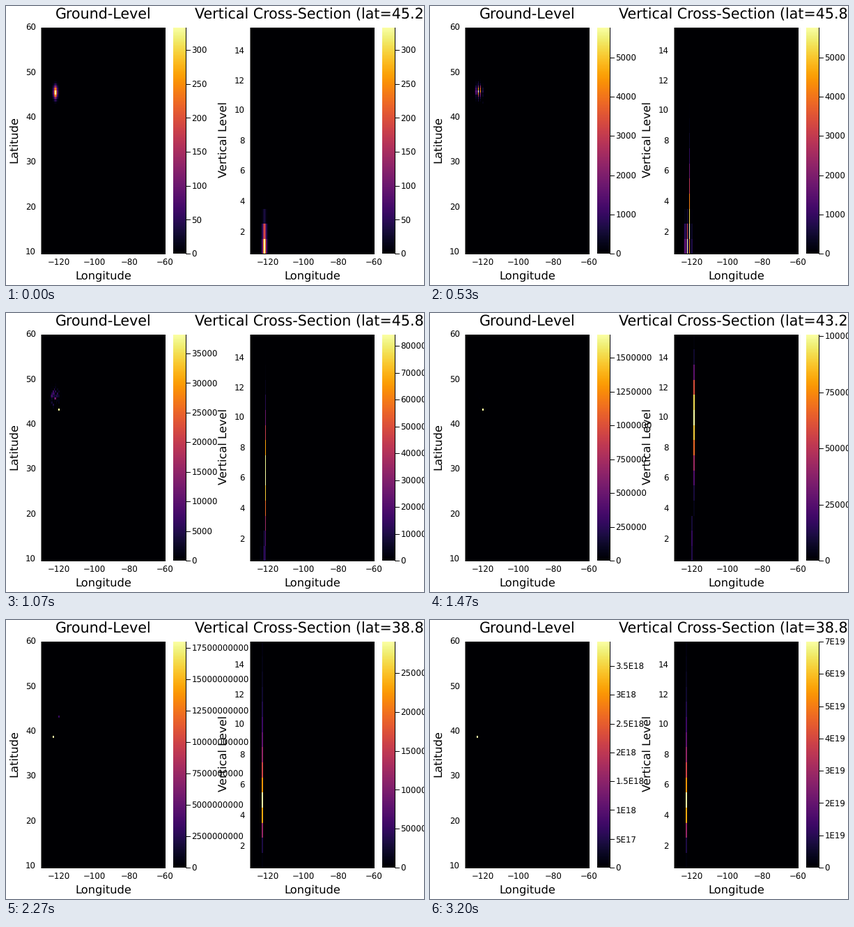
These frames come from a looping animation (600 px wide and 400 px high, 3270 ms). A matplotlib script:

```python
import math

import numpy as np
import matplotlib.pyplot as plt
from matplotlib.animation import FuncAnimation

W, H, DPI = 600, 400, 100
FRAMES, FRAME_MS = 109, 30
STEP_MS = 200 / 3  # data advances at 15 steps per second
TOP, BOTTOM = 30.5, 355.5
SPAN = BOTTOM - TOP
COLS, ROWS, LEVELS = 112, 101, 15
TICK, GUIDE, TITLE = 11.7, 16.2, 20.6  # text sizes in px

plt.rcParams["font.family"] = "DejaVu Sans"
plt.rcParams["text.hinting"] = "none"

fig = plt.figure(figsize=(W / DPI, H / DPI), dpi=DPI, facecolor="white")
ax = fig.add_axes([0, 0, 1, 1])
ax.axis("off")

cols = np.arange(COLS)
lats = 9.75 + 0.5 * np.arange(ROWS)
levels = np.arange(1, LEVELS + 1)


# ---- fields ----
def bell(x, mid, lo, hi=None):
    """Gaussian with separate widths below and above its peak."""
    width = np.where(x < mid, lo, lo if hi is None else hi)
    return np.exp(-0.5 * ((x - mid) / width) ** 2)


def growth(t, keys):
    """Piecewise exponential through (step, value) pairs."""
    times, values = zip(*keys)
    return math.exp(np.interp(t, times, np.log(values)))


def row_of(lat):
    return int(round((lat - 9.75) / 0.5))


rng = np.random.default_rng(7)
smooth = bell(lats, 45.5, 0.9)[:, None] * bell(cols, 12, 1.2)[None, :]
smooth /= smooth.max()

stripes = np.zeros(COLS)
stripes[8:16] = [0.06, 0.28, 0.18, 1, 0.12, 0.75, 0.05, 0.12]
speckle = rng.uniform(0.35, 1, (ROWS, COLS))
speckle[row_of(45.75)] = 1
striped = bell(lats, 45.75, 0.95)[:, None] * stripes * speckle

scatter = rng.random((ROWS, COLS)) ** 2 * bell(lats, 46, 1.1)[:, None]
scatter *= bell(cols, 11.5, 2)[None, :]
scatter /= scatter.max()

NORTH = [(0, 236), (8, 5780), (16, 85500), (17, 119700)]
MID_GROUND = [(0, 1.6), (16, 38300), (28, 7.34e7), (48, 2.18e13)]
MID_ALOFT = [(16, 70000), (28, 1.475e9), (48, 2.4e16)]
SOUTH_GROUND = [(0, 1e-10), (16, 0.37), (28, 4.86e6), (34, 1.8055e10),
                (41, 2.63e14), (48, 3.936e18)]
SOUTH_ALOFT = [(28, 7.5e7), (34, 2.912e11), (41, 4.556e15), (48, 7.02e19)]


def ground(t):
    early, late = min(t / 8, 1), min(max(t - 8, 0) / 8, 1)
    shape = (1 - early) * smooth + early * striped
    shape = (1 - late) * shape + late * scatter
    field = 333.9 * (t + 1) ** 1.2977 * shape / shape.max()
    field[row_of(43.25), 15] = growth(t, MID_GROUND)
    field[row_of(38.75), 10] = growth(t, SOUTH_GROUND)
    return field


def slice_lat(t):
    if t < 17:
        return 45.25 if t < 3 else 45.75
    return 43.25 if t < 34 else 38.75


def section(t, surface):
    lat = slice_lat(t)
    field = np.zeros((LEVELS, COLS))
    if lat > 45:
        field += bell(levels, 1, 0.95)[:, None] * surface[row_of(lat)]
        mid = np.interp(t, [0, 8, 16, 17], [1, 1.8, 6.4, 7])
        lo = np.interp(t, [0, 8, 16], [0.95, 1.05, 2.6])
        hi = np.interp(t, [0, 8, 16], [0.95, 2.7, 2.3])
        field[:, 13] = growth(t, NORTH) * bell(levels, mid, lo, hi)
    elif lat > 40:
        mid = np.interp(t, [17, 28], [8, 13])
        hi = np.interp(t, [17, 28], [2.2, 1.05])
        field[:, 17] = growth(t, MID_ALOFT) * bell(levels, mid, 2.5, hi)
        field[:3, 15] = growth(t, MID_GROUND) * np.array([0.8, 1, 0.6])
    else:
        d = levels - 5.0
        fall = np.where(d < 0, (np.abs(d) / 2.1) ** 2.1,
                        (np.abs(d) / 3.2) ** 1.15)
        field[:, 10] = growth(t, SOUTH_ALOFT) * np.exp(-fall)
    return field


# ---- drawing ----
PX_W, PX_TOP, PX_BOTTOM = 178, 31, 355
px_col = ((np.arange(PX_W) + 0.3) / 177.5 * COLS).astype(int)
px_up = (BOTTOM - np.arange(PX_TOP, PX_BOTTOM) - 0.5) / SPAN


def to_pixels(field):
    """Nearest-cell sampling at one value per screen pixel."""
    rows = (px_up * len(field)).astype(int)
    return field[np.ix_(rows, px_col)]


def text(x, y, s, size, ha="center", **kw):
    return ax.text(x, y, s, fontsize=size * 72 / DPI, ha=ha, va="baseline",
                   color="black", **kw)


def line(x, y, z):
    return ax.plot(x, y, color="black", lw=72 / DPI, snap=False, zorder=z,
                   solid_capstyle="butt")[0]


def raster(data, x0, x1, z):
    return ax.imshow(data, extent=(x0, x1, PX_BOTTOM, PX_TOP), origin="upper",
                     cmap="inferno", interpolation="nearest", aspect="auto",
                     vmin=0, vmax=1, zorder=z)


def label(value, peak):
    if value == 0 or peak < 1e12:
        return f"{value:.0f}"
    power = math.floor(math.log10(value) + 1e-9)
    return f"{value / 10.0 ** power:g}E{power}"


class Panel:
    def __init__(self, x, title, guide, guide_x, marks, z):
        self.x, self.z, self.ticks = x, z, []
        self.image = raster(np.zeros((PX_BOTTOM - PX_TOP, PX_W)),
                            x, x + PX_W, z)
        raster(px_up[:, None], x + 189, x + 207, z)
        line([x + 207.5] * 2, [PX_TOP, BOTTOM + 0.5], z)
        line([x, x], [PX_TOP, BOTTOM + 0.5], z)
        line([x, x + PX_W], [BOTTOM, BOTTOM], z)
        mid = x + 88.5
        self.title = text(mid, 18.3, title, TITLE)
        text(mid, 392, "Longitude", GUIDE)
        text(guide_x, 192, guide, GUIDE, rotation=90, rotation_mode="anchor")
        for lon in range(-120, -59, 20):
            text(x + (lon + 130) * 177 / 70, 372, f"\u2212{-lon}", TICK)
        for value, y in marks:
            text(x - 8, y + 4.5, str(value), TICK, ha="right")

    def show(self, field):
        peak = field.max()
        self.image.set_data(to_pixels(field / peak))
        for artist in self.ticks:
            artist.remove()
        self.ticks = []
        power = math.floor(math.log10(peak))
        lead = peak / 10.0 ** power
        step = (0.25 if lead < 2.5 else 0.5 if lead < 5 else 1) * 10.0 ** power
        for k in range(int(peak / step + 1e-9) + 1):
            y = BOTTOM - SPAN * k * step / peak
            self.ticks += [
                line([self.x + 208, self.x + 214],
                     [math.floor(y) + 0.5] * 2, self.z),
                text(self.x + 215.5, y + 4.5, label(k * step, peak), TICK,
                     ha="left", zorder=self.z)]


lat_marks = [(v, BOTTOM - (v - 9.5) * SPAN / 50.5) for v in range(10, 61, 10)]
level_marks = [(v, BOTTOM - (v - 0.5) * SPAN / 15) for v in range(2, 15, 2)]
left = Panel(51, "Ground-Level", "Latitude", 16, lat_marks, 2)
right = Panel(351, "", "Vertical Level", 316.5, level_marks, 4)
ax.set_xlim(0, W)
ax.set_ylim(H, 0)
ax.set_autoscale_on(False)


def draw(i):
    # steps start on the nearest 10 ms
    t = int((i * FRAME_MS + 23.4) / STEP_MS)
    surface = ground(t)
    left.show(surface)
    right.show(section(t, surface))
    right.title.set_text(f"Vertical Cross-Section (lat={slice_lat(t):.1f})")
    return []


anim = FuncAnimation(fig, draw, frames=FRAMES, interval=FRAME_MS,
                     init_func=lambda: draw(0), repeat=True, repeat_delay=0,
                     blit=False)
plt.show()
```
